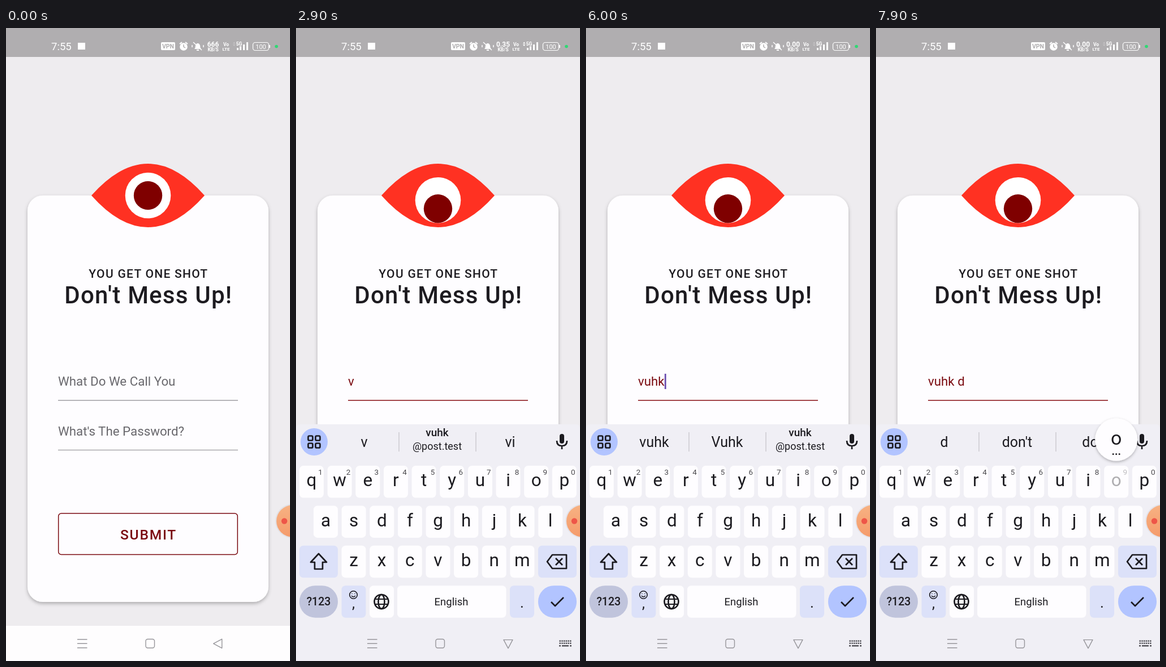
Animation of 502x1115 px, one loop 8000 ms. Source, as an HTML page:

```html
<!DOCTYPE html>
<html lang="en">
<head>
<meta charset="utf-8">
<title>One shot sign-in</title>
<style>
html, body { margin: 0; width: 100%; height: 100%; overflow: hidden; background: #eeecef; }
svg { display: block; width: 100%; height: 100%; font-family: Roboto, sans-serif; }
text { white-space: pre; }
.mid { text-anchor: middle; }
.line { fill: none; stroke: #1c1b20; stroke-width: 2.7; stroke-linejoin: round; }
.thin { fill: none; stroke: #96959a; stroke-width: 1.4; stroke-linejoin: round; }
</style>
</head>
<body>
<svg viewBox="0 0 502 1115" preserveAspectRatio="none">
  <defs>
    <filter id="cardShadow" x="-10%" y="-10%" width="120%" height="120%">
      <feDropShadow dx="0" dy="3" stdDeviation="3" flood-color="#000" flood-opacity=".27"/>
    </filter>
    <filter id="popShadow" x="-30%" y="-30%" width="160%" height="160%">
      <feDropShadow dx="0" dy="2" stdDeviation="2.5" flood-color="#000" flood-opacity=".28"/>
    </filter>
    <linearGradient id="ballFill" x1="0" y1="0" x2="0" y2="1">
      <stop offset="0" stop-color="#f7b182"/><stop offset="1" stop-color="#f59b6b"/>
    </linearGradient>
  </defs>

  <rect width="502" height="1115" fill="#eeecef"/>
  <rect x="38" y="295" width="426" height="716" rx="27" fill="#fefdff" filter="url(#cardShadow)"/>

  <path d="M151 295Q251 183 351 295Q251 407 151 295Z" fill="#ff3122"/>
  <circle id="white" cx="251" cy="295" r="40.3" fill="#fff"/>
  <circle id="pupil" cx="251" cy="295" r="25.2" fill="#7f0000"/>

  <g class="mid" fill="#1d1b20" font-weight="500">
    <text x="251.8" y="440" font-size="21" letter-spacing="1.3">YOU GET ONE SHOT</text>
    <text x="251.8" y="485" font-size="42" letter-spacing="1.2">Don't Mess Up!</text>
    <text x="252" y="900.5" font-size="24.5" letter-spacing="1.8" fill="#7a0a10">SUBMIT</text>
  </g>
  <rect x="92.7" y="855" width="316.6" height="72.5" rx="5" fill="none" stroke="#7a0a10" stroke-width="1.5"/>

  <g font-size="22.3" fill="#69686d">
    <text id="hint" x="92" y="630">What Do We Call You</text>
    <text x="92" y="718">What's The Password?</text>
    <text id="typed" x="92" y="630" fill="#7a0a10"></text>
  </g>
  <rect id="caret" y="609" width="2.8" height="27" fill="#6b4fb0"/>
  <rect id="underline" x="92" y="655" width="318" height="1.7"/>
  <rect x="92" y="742.7" width="318" height="1.5" fill="#aaa9ad"/>

  <rect width="502" height="51" fill="#b0aeb0"/>
  <g fill="#fff">
    <text x="80" y="38.5" font-size="18.5">7:55</text>
    <rect x="127" y="26" width="13" height="12"/>
    <rect x="274" y="25" width="25" height="14" rx="2"/>
    <text class="mid" x="286.5" y="36" font-size="10.5" font-weight="700" fill="#b0aeb0">VPN</text>
    <circle cx="314" cy="33" r="6.8"/>
    <path d="M307 28l4-3M321 28l-4-3" stroke="#fff" stroke-width="2"/>
    <path d="M314 29v4l3 2" fill="none" stroke="#b0aeb0" stroke-width="1.5"/>
    <path d="M333 37q2-2 2-6q1-4 4-4t4 4q0 4 2 6zM337 38h4v2h-4z"/>
    <path d="M331 25l15 14M329 30v4M349 30v4" stroke="#fff" stroke-width="1.5"/>
    <g class="mid" font-weight="700">
      <text id="rate" x="366" y="33" font-size="12"></text>
      <text x="366" y="41" font-size="8.5">KB/S</text>
      <text x="389" y="32" font-size="8.5">Vo</text>
      <text x="389" y="40" font-size="8">LTE</text>
      <text x="412" y="31" font-size="8.5">5G</text>
    </g>
    <path id="arrows" d="M401 27.5l2.2-3 2.2 3zM401 29l2.2 3 2.2-3z"/>
    <path d="M408 35h3v4h-3zM413 32h3v7h-3zM419 29h3v10h-3zM425 25h3v14h-3z"/>
    <rect x="436.5" y="25.5" width="28" height="14" rx="4" fill="none" stroke="#fff" stroke-width="1.2"/>
    <rect x="465" y="30" width="2" height="5"/>
    <text class="mid" x="450.5" y="36.5" font-size="11">100</text>
    <circle cx="478" cy="32.5" r="2.8" fill="#2fd873"/>
  </g>

  <rect y="1053" width="502" height="62" fill="#fefdfe"/>
  <g id="keyboard"></g>
  <g class="thin">
    <path d="M126 1077h17.5M126 1084.3h17.5M126 1091.7h17.5"/>
    <rect x="247" y="1076.5" width="15.5" height="15.5" rx="3.5"/>
    <path id="back" d="M-8.3 0L6.7-8V8Z"/>
  </g>
  <g id="kbIcon" fill="#55545a"></g>

  <circle cx="506" cy="868.5" r="30" fill="#000" opacity=".05"/>
  <circle cx="506" cy="868.5" r="28" fill="url(#ballFill)"/>
  <circle cx="492" cy="868.5" r="5.2" fill="#ee5548"/>

  <g id="popup">
    <circle r="37.5" fill="#fefdff" filter="url(#popShadow)"/>
    <text id="popLetter" class="mid" y="9" font-size="34" fill="#1c1b20"></text>
    <text id="popDots" class="mid" y="27" font-size="19" font-weight="700" fill="#1c1b20">...</text>
  </g>
</svg>

<script>
const LOOP = 8000, NAME = 'vuhk', MAIL = '@post.test';
const $ = id => document.getElementById(id);
const INK = '#1c1b20', PLAIN = '#fefdff', SOFT = '#dce1f9', ACCENT = '#b2c4ff', PANEL = '#f0eff5';
const rowY = i => 771 + 70.4 * i;

const label = (x, y, size, s, extra = '') =>
  `<text class="mid" x="${x}" y="${y}" font-size="${size}" fill="${INK}" ${extra}>${s}</text>`;
const box = (x, row, w, fill, r = 7, extra = '') =>
  `<rect x="${x}" y="${rowY(row)}" width="${w}" height="56.5" rx="${r}" fill="${fill}" ${extra}/>`;
const line = (d, extra = '') => `<path class="line" d="${d}" ${extra}/>`;

// Letter keys
const keys = {};
let html = `<path d="M0 1200V706q0-8 8-8H494q8 0 8 8V1200Z" fill="${PANEL}"/>`;
[['qwertyuiop', 6], ['asdfghjkl', 31], ['zxcvbnm', 80.5]].forEach(([letters, left], row) => {
  [...letters].forEach((c, i) => {
    const x = left + 49.65 * i;
    keys[c] = { x: x + 21.5, y: rowY(row) + 27 };
    html += box(x, row, 43, PLAIN) + `<g id="key-${c}">` + label(x + 21.5, rowY(row) + 36.3, 31.5, c);
    if (!row) html += label(x + 37, rowY(0) + 15.5, 13.5, (i + 1) % 10, 'opacity=".8"');
    html += '</g>';
  });
});

// Function keys
html += box(6, 2, 68, SOFT) + box(428, 2, 68, SOFT)
  + box(6, 3, 68, '#c0c4dc', 28) + box(80.5, 3, 43, SOFT) + box(130, 3, 43, PLAIN)
  + box(179, 3, 192.5, PLAIN, 7, 'id="space"') + box(378, 3, 43, SOFT) + box(428, 3, 68, ACCENT, 28)
  + line('M40 926L26 941h7v12h14v-12h7Z')
  + line('M444 940l9-12h25v24h-25ZM459 934l12 12M471 934l-12 12')
  + label(40, 1017, 19.5, '?123', 'font-weight="500"')
  + '<circle class="line" cx="101.5" cy="998.5" r="6.8" style="stroke-width:1.6"/>'
  + line('M98 1000q3.5 4 7 0M99 996v1M104 996v1', 'style="stroke-width:1.5"')
  + label(101.5, 1022, 26, ',')
  + '<circle class="line" cx="151" cy="1010.5" r="12.5"/><ellipse class="line" cx="151" cy="1010.5" rx="5.5" ry="12.5"/>'
  + line('M139 1006h24M139 1015h24', 'style="stroke-width:2"')
  + label(274.5, 1017, 18.5, 'English') + label(399.5, 1021, 26, '.')
  + line('M451 1011l7 7 15-15', 'style="stroke-width:2.7"');

// Toolbar
html += `<circle cx="32" cy="729" r="24" fill="${ACCENT}"/>`;
for (const x of [21.5, 34.5]) for (const y of [718.5, 731.5])
  html += `<rect class="line" x="${x}" y="${y}" width="8" height="8" rx="2"/>`;
html += `<rect x="466" y="715" width="8" height="17" rx="4" fill="${INK}"/>`
  + line('M461 727q0 9 9 9t9-9M470 736v6');

let teeth = '';
for (let a = 0; a < 180; a += 60)
  teeth += `<rect x="247.2" y="717.5" width="6" height="23" rx="1" fill="${INK}" transform="rotate(${a} 250.2 729)"/>`;
html += '<g id="tools">'
  + line('M95 718h19q2 0 2 2v13l-8 7h-13q-2 0-2-2v-18q0-2 2-2ZM108 740v-7h8M99 730q5 6 11 0')
  + `<circle cx="100" cy="725" r="1.8" fill="${INK}"/><circle cx="109" cy="725" r="1.8" fill="${INK}"/>`
  + label(177.5, 736, 20, 'GIF', 'font-weight="800" letter-spacing="1"')
  + teeth + `<circle cx="250.2" cy="729" r="6.4" fill="${PANEL}" stroke="${INK}" stroke-width="5"/>`
  + '<rect x="312" y="718" width="22" height="22" fill="#3b3a40"/>'
  + `<path d="M396 717.5a11.5 11.5 0 1 0 0 23q3 0 2-3-2-4 2-4h4q4-1 4-5-1-11-12-11Z" fill="${INK}"/>`
  + [[389, 729], [392, 723], [399, 722.5], [403.5, 727]].map(([x, y]) => `<circle cx="${x}" cy="${y}" r="1.9" fill="${PANEL}"/>`).join('')
  + '</g><g id="words"></g>';
$('keyboard').innerHTML = html;

// Keyboard switch icon
let dots = '';
for (let r = 0; r < 2; r++) for (let c = 0; c < 6; c++)
  dots += `<rect x="${465.5 + c * 3.7}" y="${1078.5 + r * 4}" width="2.5" height="2.5"/>`;
$('kbIcon').innerHTML = dots + '<path d="M465 1087h3v2.5h-3zM470 1087h12v2.5h-12zM484 1087h3v2.5h-3z"/>';

// Timelines: [start, value]
const cap = s => s[0].toUpperCase() + s.slice(1);
const part = n => NAME.slice(0, n);
const choices = n => [part(n), cap(part(n)), MAIL];
const typing = [[0, ''], [2000, part(1)], [3300, part(2)], [3900, part(3)], [4800, NAME], [6500, NAME + ' '], [7400, NAME + ' d']];
const words = [[0, null], [1900, [part(1), MAIL, part(1) + 'i']], [3300, choices(2)], [3900, choices(3)],
  [4800, choices(4)], [6500, ['sulv', 'yomb', 's']], [7400, ['d', "don't", 'do']]];
const presses = [[0, ''], [1700, NAME[0]], [1900, ''], [3100, NAME[1]], [3300, ''], [3800, NAME[2]], [3900, ''],
  [4650, NAME[3]], [4800, ''], [6400, ' '], [6500, ''], [7200, 'd'], [7400, ''], [7900, 'o']];
const blinks = [[0, 0], [200, 1], [1700, 0], [2000, 1], [2700, 0], [3200, 1], [4400, 0], [4800, 1],
  [5300, 0], [5800, 1], [6300, 0], [6500, 1], [7000, 0], [7400, 1], [7900, 0]];
const rates = [[0, '666'], [1000, '0.35'], [4400, '0.42'], [5800, '0.00']];

const at = (table, t) => table.findLast(([start]) => start <= t);
const value = (table, t) => at(table, t)[1];
const clamp = v => Math.min(1, Math.max(0, v));
const show = (id, on) => $(id).setAttribute('visibility', on ? 'visible' : 'hidden');
const set = (id, name, v) => $(id).setAttribute(name, v);

let shownWords;
function drawWords(list) {
  if (list === shownWords) return;
  shownWords = list;
  show('tools', !list);
  $('words').innerHTML = !list ? '' : list.map((w, i) => {
    const x = 120.5 + 129 * i;
    return w === MAIL
      ? label(x, 718.5, 19, NAME, 'font-weight="500"') + label(x, 743, 18, MAIL)
      : label(x, 738, 25, w);
  }).join('') + '<path d="M182 712v34M318 712v34" stroke="#cbcad0" stroke-width="1.5"/>';
}

let dimmed;
function drawPress(key) {
  if (dimmed) dimmed.setAttribute('opacity', 1);
  dimmed = key.trim() ? $('key-' + key) : null;
  set('space', 'fill', key === ' ' ? '#dedde4' : PLAIN);
  show('popup', dimmed);
  show('popDots', dimmed && 'odu'.includes(key));
  if (!dimmed) return;
  dimmed.setAttribute('opacity', .35);
  set('popup', 'transform', `translate(${keys[key].x} ${keys[key].y - 73})`);
  $('popLetter').textContent = key;
}

function render(t) {
  const [since, text] = at(typing, t);
  const focused = t >= 200;
  $('typed').textContent = text;
  show('hint', !text);
  set('caret', 'x', 92.2 + (text ? $('typed').getComputedTextLength() : 0));
  show('caret', value(blinks, t));
  set('underline', 'fill', focused ? '#94282d' : '#aaa9ad');

  // The eye drops its gaze anew after every typed character
  const look = text ? clamp((t - since) / 360) : 0;
  set('white', 'cy', 295 + 8.3 * look);
  set('pupil', 'cy', 295 + 23.3 * look);

  const rest = 1 - clamp((t - 772) / 300);
  set('keyboard', 'transform', `translate(0 ${417 * rest ** 3})`);
  set('back', 'transform', `translate(375 1084.3) rotate(${-90 * (1 - rest ** 2)})`);
  show('kbIcon', rest < 1);

  $('rate').textContent = value(rates, t);
  set('arrows', 'opacity', t >= 2700 && t < 3900 ? 1 : .25);
  drawWords(value(words, t));
  drawPress(value(presses, t));
}

function tick() {
  render((performance.now() + 15) % LOOP);
  requestAnimationFrame(tick);
}
tick();
</script>
</body>
</html>
```
